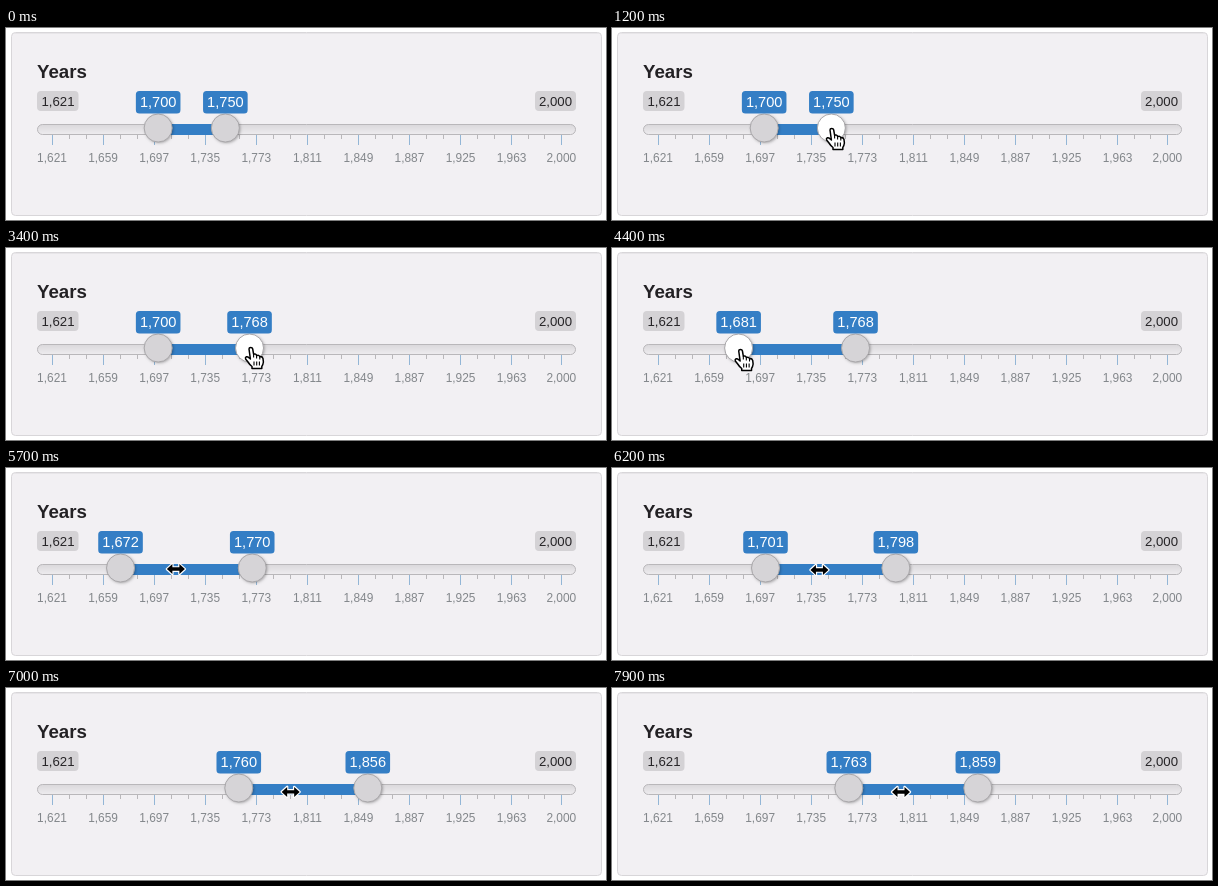
An HTML page with a canvas that plays this animation: 600x192 px, repeating every 8 s.

```html
<!DOCTYPE html>
<html lang="en">
<head>
<meta charset="utf-8">
<title>Years slider</title>
<style>
  html, body { margin: 0; width: 100%; height: 100%; overflow: hidden; background: #fff; }
  canvas { display: block; width: 600px; height: 192px; }
</style>
</head>
<body>
<canvas id="stage"></canvas>
<script>
const LOOP = 8000, STEP = 100;
const MIN = 1621, MAX = 2000, GRID = 38;
const FONT = '"Liberation Sans", Arial, sans-serif';
const BLUE = '#347ec5';

const canvas = document.getElementById('stage');
const ctx = canvas.getContext('2d');
const dpr = window.devicePixelRatio || 1;
canvas.width = 600 * dpr;
canvas.height = 192 * dpr;

// Each glide eases to a target between two steps of 100 ms.
const lowPath = { start: [1700], glides: [
  { from: 41, to: 46, at: [1671] },
  { from: 56, to: 71.8, at: [1763] }
] };
const highPath = { start: [1750], glides: [
  { from: 14, to: 24.6, at: [1802] },
  { from: 27, to: 34, at: [1768] }
] };
const mousePath = { start: [324, 138], glides: [
  { from: 1, to: 6, at: [158, 102] },
  { from: 6, to: 12, at: [220, 101] },
  { from: 13.2, to: 24, at: [290, 97] },
  { from: 27, to: 34, at: [245, 100] },
  { from: 35, to: 40, at: [154, 102] },
  { from: 41, to: 46, at: [115, 102] },
  { from: 48, to: 52, at: [168.5, 101] },
  { from: 56, to: 71.8, at: [289, 104] }
] };
const MOUSE_IN = 1, RANGE_DRAG = 57;

function ease(from, to, step) {
  const u = Math.min(1, Math.max(0, (step - from) / (to - from)));
  return u * u * (3 - 2 * u);
}

function follow(path, step) {
  return path.glides.reduce((pos, { from, to, at }) => {
    const f = ease(from, to, step);
    return pos.map((v, i) => v + (at[i] - v) * f);
  }, path.start);
}

const toX = year => 46 + (year - MIN) * 509.3 / (MAX - MIN);
const format = year => year.toLocaleString('en-US');

function box(x, y, w, h, r, fill, stroke) {
  ctx.beginPath();
  ctx.roundRect(x, y, w, h, r);
  ctx.fillStyle = fill;
  ctx.fill();
  if (stroke) {
    ctx.strokeStyle = stroke;
    ctx.lineWidth = 1;
    ctx.stroke();
  }
}

function text(str, x, y, size, color, align = 'center', weight = '') {
  ctx.font = `${weight} ${size}px ${FONT}`;
  ctx.textAlign = align;
  ctx.fillStyle = color;
  ctx.fillText(str, x, y);
}

function drawPanel() {
  ctx.fillStyle = '#fff';
  ctx.fillRect(0, 0, 600, 192);
  box(5.5, 4.5, 590, 183, 4, '#f2f0f3', '#d8d6d9');
  ctx.fillStyle = '#e7e5e8';
  ctx.fillRect(8, 5, 585, 1);
  text('Years', 31, 50, 18.7, '#232124', 'left', 'bold');
  box(31, 63, 41.5, 20, 4, '#d4d2d5');
  box(529, 63, 41, 20, 4, '#d4d2d5');
  text(format(MIN), 52, 78, 13.2, '#262427');
  text(format(MAX), 549.5, 78, 13.2, '#262427');
}

function drawTick(year, color, height) {
  ctx.fillStyle = color;
  ctx.fillRect(Math.floor(toX(year)), 106, 1, height);
}

function drawGrid() {
  for (let year = MIN; year <= MAX; year = year < MAX ? Math.min(year + GRID, MAX) : MAX + 1) {
    drawTick(year, '#93b6d6', 11);
    text(format(year), toX(year), 134, 11.9, '#83878b');
    const gap = Math.min(GRID, MAX - year) / 3;
    for (let k = 1; k < 3 && gap > 0; k++) drawTick(year + gap * k, '#b9b7ba', 5);
  }
}

function drawTrack(from, to) {
  const shade = ctx.createLinearGradient(0, 96, 0, 107);
  shade.addColorStop(0, '#d9d7da');
  shade.addColorStop(1, '#efedf0');
  box(31.5, 96.5, 538, 10, 5, shade, '#b9b7ba');
  ctx.fillStyle = BLUE;
  ctx.fillRect(from, 96, to - from, 11);
}

function drawHandle(x, hover) {
  ctx.save();
  ctx.shadowColor = 'rgba(0,0,0,.32)';
  ctx.shadowBlur = 3 * dpr;
  ctx.shadowOffsetX = dpr;
  ctx.shadowOffsetY = dpr;
  ctx.beginPath();
  ctx.arc(x, 100, 14, 0, Math.PI * 2);
  ctx.fillStyle = hover ? '#fff' : '#d6d4d7';
  ctx.fill();
  ctx.restore();
  ctx.strokeStyle = '#a9a7aa';
  ctx.lineWidth = 1;
  ctx.stroke();
}

function drawTag(x, year) {
  box(x - 22.3, 63, 44.6, 22.5, 3.5, BLUE);
  text(format(year), x, 79, 14.6, '#fff');
}

const HAND = new Path2D(`M-2 1C-2-1 1.4-1 1.7 1L2.6 6.2Q5 5.4 5.6 7.6
  Q8 6.6 8.8 8.8Q11 8 12 10.6L12.4 14Q12 17 10.8 18.5V20.5H1
  V18.5Q-1.5 16.5-3 14L-5.4 11Q-6 9.4-4.6 8.8Q-3.2 8.6-1.8 10L-.6 11Z`);
const HAND_LINES = new Path2D('M2.6 6V9.5M5.6 7.6V10.5M8.8 8.8V11.5M3 13.5V17.5M5.7 13.5V17.5M8.4 13.5V17.5');
const RESIZE = new Path2D('M-9 0L-3.5-5V-1.7H3.5V-5L9 0L3.5 5V1.7H-3.5V5Z');
const ARROW = new Path2D('M0 0V15.5L3.6 12.2L6 17.8L8.7 16.6L6.3 11.1H11Z');

function drawMouse(kind, x, y) {
  ctx.save();
  ctx.translate(x, y);
  ctx.lineJoin = 'round';
  if (kind === 'hand') {
    ctx.fillStyle = '#fff';
    ctx.strokeStyle = '#000';
    ctx.lineWidth = 1.5;
    ctx.fill(HAND);
    ctx.stroke(HAND);
    ctx.lineWidth = 1.1;
    ctx.stroke(HAND_LINES);
  } else {
    const shape = kind === 'resize' ? RESIZE : ARROW;
    ctx.strokeStyle = '#fff';
    ctx.lineWidth = 2.4;
    ctx.stroke(shape);
    ctx.fillStyle = '#000';
    ctx.fill(shape);
  }
  ctx.restore();
}

function draw(time) {
  const step = Math.floor((time % LOOP) / STEP);
  const low = Math.round(follow(lowPath, step)[0]);
  // The dragged range narrows slightly as it moves right.
  const high = Math.round(step < RANGE_DRAG
    ? follow(highPath, step)[0]
    : low + 98 - (low - 1672) / 45);
  const lowX = toX(low), highX = toX(high);
  const [mx, my] = follow(mousePath, step);
  const shown = step >= MOUSE_IN;
  const over = x => shown && Math.hypot(mx - x, my - 100) < 15;
  const overLow = over(lowX), overHigh = over(highX);
  const overBar = mx > lowX && mx < highX && my > 94 && my < 108;

  ctx.setTransform(dpr, 0, 0, dpr, 0, 0);
  drawPanel();
  drawGrid();
  drawTrack(lowX, highX);
  drawHandle(lowX, overLow);
  drawHandle(highX, overHigh);
  drawTag(lowX, low);
  drawTag(highX, high);
  if (shown) drawMouse(overLow || overHigh ? 'hand' : overBar ? 'resize' : 'arrow', mx, my);
}

const start = performance.now();
function tick() {
  draw(performance.now() - start);
  requestAnimationFrame(tick);
}
tick();
</script>
</body>
</html>
```
